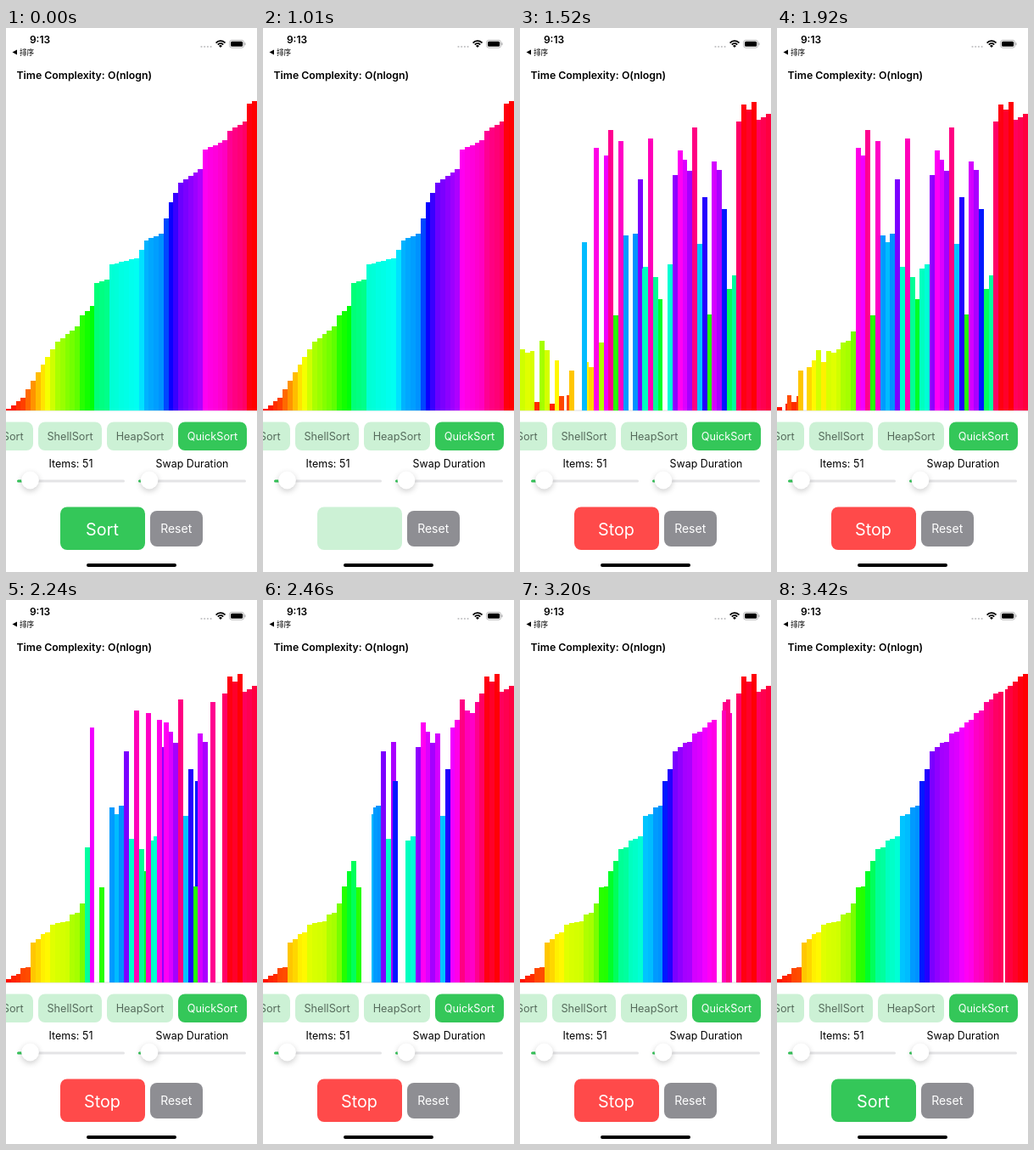
Animation of 296 by 640 pixels, one loop 3.44 s. Source, as an HTML page with a canvas:

```html
<!DOCTYPE html>
<html lang="en">
<head>
<meta charset="utf-8">
<title>Quick sort</title>
<style>
  html, body { margin: 0; width: 100%; height: 100%; overflow: hidden; background: #fff; }
  canvas { display: block; width: 296px; height: 640px; }
</style>
</head>
<body>
<canvas id="stage"></canvas>
<script>
const W = 296, H = 640, LOOP = 3440;
const BASE = 450, FULL = 364;
const PRESS = 1010, RESHUFFLE = 1120, DONE = 3400;
// Pace of the sort in ms
const SORT_START = 981, CALL_TIME = 24, SCAN_TIME = 1.4, SWAP_TIME = 13, MOVE_TIME = 70;
const GREEN = '#34c759', RED = '#ff4a4a', PALE = '#ccf1d5', GRAY = '#8e8e93';
const SANS = 'Inter, "Noto Sans", sans-serif';

const canvas = document.getElementById('stage');
const ctx = canvas.getContext('2d');
const ratio = window.devicePixelRatio || 1;
canvas.width = W * ratio;
canvas.height = H * ratio;

// The unsorted input, as bar tops in px; every swap follows from it
const tops = [
  110, 101, 307, 213, 167, 117, 105, 173, 433, 278, 403, 283, 252, 108, 399, 141, 370,
  150, 120, 338, 133, 87, 446, 242, 178, 281, 130, 293, 96, 432, 391, 379, 144, 155,
  168, 368, 90, 199, 337, 157, 440, 380, 378, 291, 254, 319, 244, 393, 442, 382, 357];
const COUNT = tops.length;
const BAR = W / COUNT;

// Outline of the earlier, already sorted bars: slot and top
const outline = [[0, 448], [3, 435], [6, 405], [10, 369], [14, 351], [15, 338], [17, 327],
  [18, 300], [20, 296], [21, 278], [26, 271], [28, 250], [31, 242], [33, 205], [35, 182],
  [39, 166], [40, 143], [44, 132], [45, 121], [48, 110], [49, 89], [50, 86]];

const clamp = v => Math.min(1, Math.max(0, v));
const ease = v => { const p = clamp(v); return p * p * (3 - 2 * p); };

function outlineTop(slot) {
  const next = Math.max(1, outline.findIndex(([s]) => s >= slot));
  const [s0, y0] = outline[next - 1], [s1, y1] = outline[next];
  return Math.round(y0 + (y1 - y0) * (slot - s0) / (s1 - s0));
}

// Quick sort that carries the pivot from side to side, noting each swap's time
function planSwaps() {
  const heights = tops.map(top => BASE - top);
  const swaps = [];
  let clock = SORT_START;
  const swap = (a, b) => {
    [heights[a], heights[b]] = [heights[b], heights[a]];
    swaps.push({ a, b, time: clock });
    clock += SWAP_TIME;
  };
  const sort = (low, high) => {
    if (low >= high) return;
    clock += CALL_TIME;
    const pivot = heights[low];
    let left = low, right = high;
    while (left < right) {
      while (left < right && heights[right] >= pivot) { right--; clock += SCAN_TIME; }
      if (left < right) swap(left, right);
      while (left < right && heights[left] <= pivot) { left++; clock += SCAN_TIME; }
      if (left < right) swap(left, right);
    }
    sort(low, left - 1);
    sort(left + 1, high);
  };
  sort(0, COUNT - 1);
  return swaps;
}

const swaps = planSwaps();
const sortedBars = tops.map((_, slot) => ({ top: outlineTop(slot), slot }));

// Overlapping moves of one bar add up; later slots lie in front
function barsAt(t) {
  const bars = tops.map((top, slot) => ({ top, slot }));
  for (const { a, b, time } of swaps) {
    if (time > t) break;
    const shift = (b - a) * ease((t - time) / MOVE_TIME);
    bars[a].slot += shift;
    bars[b].slot -= shift;
    [bars[a], bars[b]] = [bars[b], bars[a]];
  }
  return bars;
}

function drawBar({ top, slot }) {
  const x = Math.round(slot * BAR), right = Math.round((slot + 1) * BAR);
  ctx.fillStyle = `hsl(${(BASE - top) / FULL * 360} 100% 50%)`;
  ctx.fillRect(x, top, right - x, BASE - top);
}

function box(x, y, w, h, r, color) {
  ctx.fillStyle = color;
  ctx.beginPath();
  ctx.roundRect(x, y, w, h, r);
  ctx.fill();
}

function disc(x, y, r, color) {
  ctx.fillStyle = color;
  ctx.beginPath();
  ctx.arc(x, y, r, 0, Math.PI * 2);
  ctx.fill();
}

function label(text, x, y, size, color = '#000', align = 'center', weight = 400, font = SANS) {
  ctx.font = `${weight} ${size}px ${font}`;
  ctx.textAlign = align;
  ctx.textBaseline = 'alphabetic';
  ctx.fillStyle = color;
  ctx.fillText(text, x, y);
}

function statusBar() {
  label('9:13', 40, 18, 12, '#000', 'center', 600);
  ctx.beginPath();
  ctx.moveTo(7.5, 28.5);
  ctx.lineTo(13, 25.5);
  ctx.lineTo(13, 31.5);
  ctx.fill();
  label('排序', 16, 31.5, 8.6, '#000', 'left', 400, '"Noto Sans CJK SC", "Noto Sans CJK JP", sans-serif');

  for (let i = 0; i < 4; i++) disc(230.5 + i * 3.7, 22, 1.1, '#c2c2c4');

  const fan = [-Math.PI * 0.76, -Math.PI * 0.24];
  ctx.strokeStyle = '#000';
  ctx.lineWidth = 1.8;
  for (const r of [4.4, 7.4]) {
    ctx.beginPath();
    ctx.arc(253, 22.6, r, ...fan);
    ctx.stroke();
  }
  ctx.fillStyle = '#000';
  ctx.beginPath();
  ctx.moveTo(253, 23);
  ctx.arc(253, 23, 2.8, ...fan);
  ctx.fill();

  ctx.strokeStyle = '#a6a6a8';
  ctx.lineWidth = 0.8;
  ctx.beginPath();
  ctx.roundRect(263.6, 14.4, 17, 8.8, 2.6);
  ctx.stroke();
  box(265, 15.8, 14.2, 6, 1.5, '#000');
  box(281.4, 17.3, 1.1, 3, 0.6, '#a6a6a8');
}

function slider(x, knob) {
  box(x, 531.5, 127, 3, 1.5, '#e4e4e6');
  box(x, 531.5, knob - x, 3, 1.5, GREEN);
  ctx.save();
  ctx.shadowColor = 'rgba(0,0,0,.2)';
  ctx.shadowBlur = 7 * ratio;
  ctx.shadowOffsetY = 2.5 * ratio;
  disc(knob, 532, 10.4, '#fff');
  ctx.restore();
}

function tab(text, x, w, active) {
  box(x, 463.5, w, 33.5, 8, active ? GREEN : PALE);
  label(text, x + w / 2, 485, 12.7, active ? '#fff' : '#566b5c');
}

function mainButton(t) {
  const running = t >= RESHUFFLE && t < DONE;
  const pressed = t >= PRESS && t < RESHUFFLE;
  ctx.globalAlpha = pressed ? 0.25 : running ? clamp(0.38 + (t - RESHUFFLE) / 370) : 1;
  box(64, 563.5, 100, 50.5, 8, running ? RED : GREEN);
  if (!pressed) label(running ? 'Stop' : 'Sort', 113.5, 596.5, 19.8, '#fff');
  ctx.globalAlpha = 1;
}

function controls(t) {
  tab('MergeSort', -54, 86, false);
  tab('ShellSort', 38, 75, false);
  tab('HeapSort', 119, 78, false);
  tab('QuickSort', 203, 81, true);
  label('Items: 51', 76.5, 517, 12.5);
  label('Swap Duration', 219.5, 517, 12.4);
  slider(13, 28.5);
  slider(156, 169);
  mainButton(t);
  box(170, 568, 62, 42, 8, GRAY);
  label('Reset', 200.7, 594, 14, '#fff');
  box(95, 630, 106, 4, 2, '#000');
}

// The picture refreshes about ten times a second, slightly slower in the second half
function snap(t) {
  if (t < PRESS) return 0;
  if (t < RESHUFFLE) return PRESS;
  const [from, step] = t < 2225 ? [RESHUFFLE, 100] : [2240, 106];
  return from + Math.floor((t - from + 15) / step) * step;
}

function draw(t) {
  ctx.setTransform(ratio, 0, 0, ratio, 0, 0);
  ctx.fillStyle = '#fff';
  ctx.fillRect(0, 0, W, H);
  box(0, BASE - 0.5, W, 1, 0, '#dedee0');
  (t < RESHUFFLE ? sortedBars : barsAt(t)).forEach(drawBar);
  statusBar();
  label('Time Complexity: O(nlogn)', 12.5, 60, 12.3, '#000', 'left', 600);
  controls(t);
}

function frame() {
  draw(snap(performance.now() % LOOP));
  requestAnimationFrame(frame);
}
frame();
</script>
</body>
</html>
```
